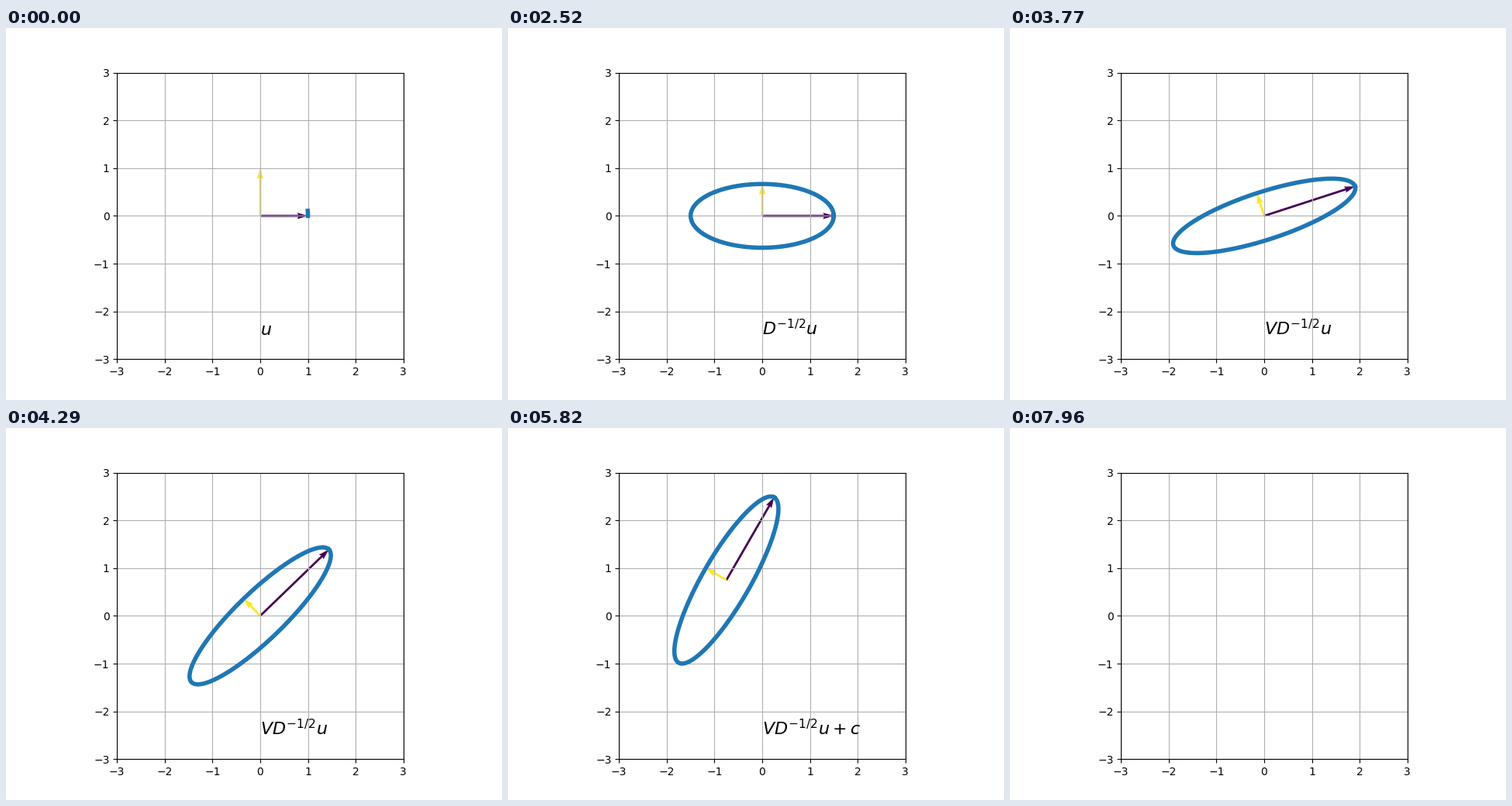
These frames come from a looping animation (640 px wide and 480 px high, 8.04 s). A matplotlib script:

```python
import matplotlib.pyplot as plt
import numpy as np
from matplotlib.animation import FuncAnimation

FRAMES, INTERVAL = 201, 40
# First step of each phase
DRAW, SCALE, ROTATE, SHIFT, FADE = 0, 50, 86, 128, 177
LABELS = [
    (SHIFT, r"$VD^{-1/2}u+c$"),
    (ROTATE, r"$VD^{-1/2}u$"),
    (SCALE, r"$D^{-1/2}u$"),
    (DRAW, r"$u$"),
]
ANGLE = np.pi / 3
CENTER = np.array([-1.0, 1.0])
POINTS = 300

phi = np.linspace(0, 2 * np.pi, POINTS)
circle = np.array([np.cos(phi), np.sin(phi)])

fig, ax = plt.subplots(figsize=(6.4, 4.8), dpi=100)
ax.set_aspect("equal")
ax.set_xlim(-3, 3)
ax.set_ylim(-3, 3)
ax.grid()

curve, = ax.plot([], [], lw=4, color="C0")
axes_uv = ax.quiver([0, 0], [0, 0], [1, 0], [0, 1], [0, 1],
                    angles="xy", scale_units="xy", scale=1)
label = ax.text(0, -2.5, "", fontsize=16)


def progress(n, start, steps):
    return min(max((n - start + 1) / steps, 0), 1)


def transform(n):
    """Matrix and offset applied to the unit circle at step n."""
    stretch = 2 ** progress(n, SCALE, 24)
    a = ANGLE * progress(n, ROTATE, 30)
    rot = np.array([[np.cos(a), -np.sin(a)], [np.sin(a), np.cos(a)]])
    return rot @ np.diag([stretch, 1 / stretch]), CENTER * progress(n, SHIFT, 24)


def update(n):
    mat, offset = transform(n)
    count = round(POINTS * progress(n, DRAW, 50))
    curve.set_data(*(mat @ circle[:, :count] + offset[:, None]))
    axes_uv.set_offsets([offset, offset])
    axes_uv.set_UVC(mat[0], mat[1])
    label.set_text(next(s for start, s in LABELS if n >= start))

    alpha = 1 - progress(n, FADE, 24)
    if alpha < 0.05:
        alpha = 0
    for artist in (curve, axes_uv, label):
        artist.set_alpha(alpha)
    return curve, axes_uv, label


anim = FuncAnimation(fig, update, frames=FRAMES, interval=INTERVAL,
                     repeat=True, repeat_delay=0, blit=False)
plt.show()
```
